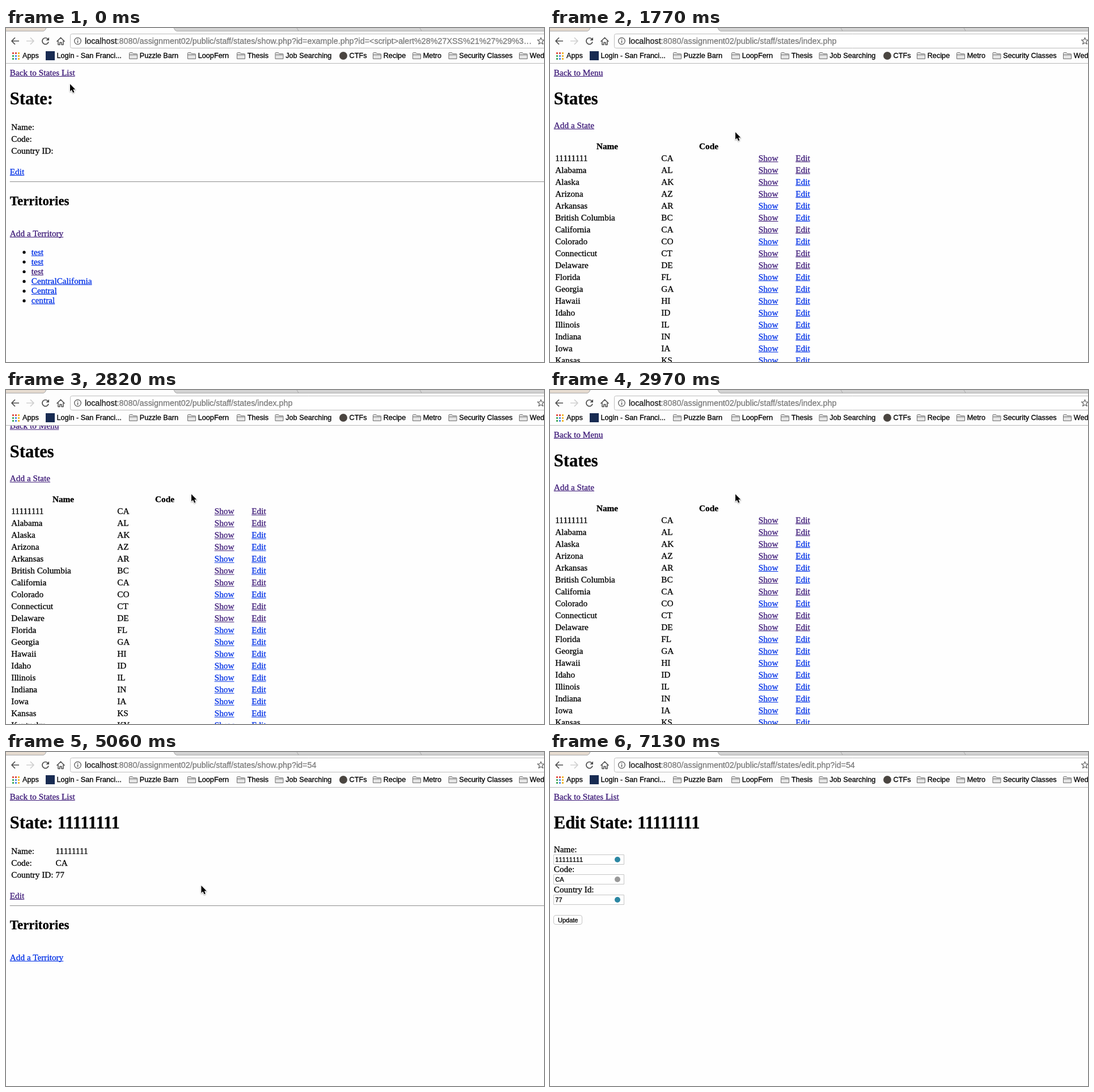
An HTML page with a canvas for the animation above (8000 ms loop, 949 px wide and 590 px high).

```html
<!DOCTYPE html>
<html lang="en">
<head>
<meta charset="utf-8">
<title>State pages</title>
<style>
html, body { margin: 0; width: 100%; height: 100%; overflow: hidden; background: #fefefe; }
canvas { display: block; }
</style>
</head>
<body>
<canvas id="stage" width="949" height="590"></canvas>
<script>
const ctx = document.getElementById('stage').getContext('2d');
const LOOP = 8000, STEP = 145;
const SERIF = '"Liberation Serif", serif', SANS = '"Liberation Sans", sans-serif';
const BODY = '15.27px ' + SERIF, BOLD = 'bold ' + BODY;
const H1 = 'bold 30.5px ' + SERIF, H2 = 'bold 22.9px ' + SERIF;
const UI = '12.7px ' + SANS, URL_FONT = '14.35px ' + SANS, FIELD = '11px ' + SANS;
const BLUE = '#0030e6', PURPLE = '#3d1a78', RED = '#ff2a14', INK = '#000';
const LEFT = 6.8;

const STATES = ('11111111 CA,Alabama AL,Alaska AK,Arizona AZ,Arkansas AR,British Columbia BC,' +
  'California CA,Colorado CO,Connecticut CT,Delaware DE,Florida FL,Georgia GA,Hawaii HI,' +
  'Idaho ID,Illinois IL,Indiana IN,Iowa IA,Kansas KS,Kentucky KY,Louisiana LA,Maine ME')
  .split(',').map(s => [s.slice(0, -3), s.slice(-2)]);
const SHOWN = new Set([0, 1, 2, 3, 5, 6, 8, 9]), EDITED = new Set([0, 1, 6, 8, 9]);

const FOLDERS = [[217, 'Puzzle Barn'], [320, 'LoopFern'], [407, 'Thesis'], [474.5, 'Job Searching'],
  [647, 'Recipe'], [717, 'Metro'], [780.5, 'Security Classes'], [905, 'Wednesday']];

// Pointer moves: start time, number of steps, end point
const MOVES = [[150, 2, 88, 79], [887, 3, 432, 116], [1480, 3, 327, 184],
  [3420, 4, 382, 234], [5060, 5, 21, 254], [6240, 6, 500, 163]];
// Times at which the hand pointer is shown
const HANDS = [[295, 887], [3855, 5060], [5640, 6240]];
// Page scroll from each time on
const SCROLL = [[0, 0], [1920, 35], [2070, 46.6], [2820, 15.6], [2970, 0]];

const ARROW = new Path2D('M0 0V12.8L3 10.2L5.1 15.2L7.4 14.2L5.3 9.4H9.3Z');
const HAND = new Path2D('M3.5 1.8Q5 .2 6.3 2L8 6.5Q9.5 5.3 10.3 6.6Q11.8 5.6 12.3 7Q13.8 6.5 14 8.5' +
  'L13.8 12L12.5 16.3H6L4.5 13.8L1 9.8Q.8 8.3 2.3 8.5L4.5 10Z');
const FINGERS = new Path2D('M8 10V13.5M10 10V13.5M12 10V13.5');

const within = (t, a, b) => t >= a && t < b;

// A hairline stroke gives the slightly heavy smoothing of the screen text
function text(s, x, y, font = BODY, color = INK, align = 'left') {
  ctx.font = font;
  ctx.fillStyle = ctx.strokeStyle = color;
  ctx.lineWidth = .3;
  ctx.textAlign = align;
  ctx.fillText(s, x, y);
  ctx.strokeText(s, x, y);
}

function link(s, x, y, color) {
  text(s, x, y, BODY, color);
  ctx.fillRect(x, Math.round(y) + 1, ctx.measureText(s).width, 1);
}

function rect(x, y, w, h, color) {
  ctx.fillStyle = color;
  ctx.fillRect(x, y, w, h);
}

function disc(x, y, r, color) {
  ctx.fillStyle = color;
  ctx.beginPath();
  ctx.arc(x, y, r, 0, 7);
  ctx.fill();
}

function rounded(x, y, w, h, r, fill, stroke) {
  ctx.beginPath();
  ctx.roundRect(x, y, w, h, r);
  ctx.fillStyle = fill;
  ctx.fill();
  ctx.strokeStyle = stroke;
  ctx.lineWidth = 1;
  ctx.stroke();
}

function line(d, color, width = 1.7) {
  ctx.strokeStyle = color;
  ctx.lineWidth = width;
  ctx.stroke(new Path2D(d));
}

function tabs() {
  rect(0, 0, 949, 5, '#d3d3d3');
  rect(0, 0, 69, 5, '#e6dbd0');
  ctx.fillStyle = '#fdfdfd';
  ctx.fill(new Path2D('M71 0H296L299 6H67Z'));
  line('M0 5.5H66Q69 5 71 0M296 0Q298 5 301 5.5H949M513 0L516 5M730 0L733 5', '#a9a9a9', 1);
}

function folder(x, label) {
  ctx.fillStyle = '#e4e4e4';
  const d = `M${x + .5} 54V44.5Q${x + .5} 43.5 ${x + 1.5} 43.5H${x + 6}L${x + 7.5} 45.5H${x + 13.5}` +
    `Q${x + 14.5} 45.5 ${x + 14.5} 46.5V54.5H${x + .5}Z`;
  ctx.fill(new Path2D(d));
  line(d + `M${x + 1} 47.5H${x + 14}`, '#6e6e6e', 1);
  text(label, x + 18.7, 53.3, UI);
}

function chrome(url, loading) {
  rect(0, 0, 949, 62, '#fdfdfd');
  tabs();
  line('M23 23H10.5M16 17L10 23L16 29', '#4d4d4d');
  line('M36 23H48.5M43 17L49 23L43 29', '#cfcfcf');
  if (loading) line('M64.5 18L74.5 28M74.5 18L64.5 28', '#4d4d4d');
  else {
    line('M73.6 19.2A5.6 5.6 0 1 0 75 24.5', '#4d4d4d');
    ctx.fillStyle = '#4d4d4d';
    ctx.fill(new Path2D('M76 16.5V22H70.5Z'));
  }
  line('M89.5 24L96.5 17L103.5 24M92 22.5V29.5H95V25.5H98V29.5H101V22.5', '#4d4d4d', 1.5);

  rounded(113.5, 10.5, 860, 25, 3, '#fff', '#bdbdbd');
  ctx.beginPath();
  ctx.arc(126.5, 23, 5.8, 0, 7);
  ctx.strokeStyle = '#5a5a5a';
  ctx.lineWidth = 1.3;
  ctx.stroke();
  rect(125.8, 22, 1.5, 4.5, '#5a5a5a');
  rect(125.8, 19.3, 1.5, 1.5, '#5a5a5a');
  text('localhost', 139, 28, URL_FONT, '#202020');
  const x = 139 + ctx.measureText('localhost').width;
  text(':8080/assignment02/public/staff/states/' + url, x, 28, URL_FONT, '#7b7b7b');
  line('M943.5 17L945.2 21H949.5L946 24L947.3 28.5L943.5 26L939.7 28.5L941 24L937.5 21H941.8Z', '#666', 1.2);

  const dots = ['#e04a3f', '#e04a3f', '#f0b52c', '#3fa757', '#4a86e8', '#f0b52c', '#3fa757', '#4a86e8', '#f0b52c'];
  dots.forEach((c, i) => rect(11 + i % 3 * 5, 43 + (i / 3 | 0) * 5, 3, 3, c));
  text('Apps', 29, 53.3, UI);
  rect(70, 41, 16, 16, '#182b52');
  text('Login - San Franci...', 89.5, 53.3, UI);
  disc(595, 49, 7, '#4a4540');
  text('CTFs', 605.5, 53.3, UI);
  FOLDERS.forEach(f => folder(...f));
  rect(0, 62, 949, 1, '#b8b8b8');
}

function details(t, filled) {
  link('Back to States List', LEFT, 84, !filled && within(t, 445, 592) ? RED : PURPLE);
  text(filled ? 'State: 11111111' : 'State:', LEFT, 135, H1);
  ['Name:', 'Code:', 'Country ID:'].forEach((s, i) => {
    text(s, 9.3, 180 + 21 * i);
    if (filled) text(['11111111', 'CA', '77'][i], 87.5, 180 + 21 * i);
  });
  link('Edit', LEFT, 259, filled ? (t >= 5785 ? RED : PURPLE) : BLUE);
  rect(LEFT, 271, 949, 1, '#8c8c8c');
  text('Territories', LEFT, 313, H2);
  link('Add a Territory', LEFT, 368, filled ? BLUE : PURPLE);
  if (filled) return;
  ['test', 'test', 'test', 'CentralCalifornia', 'Central', 'central'].forEach((s, i) => {
    const y = 400.5 + 17.15 * i;
    disc(32, y - 4.3, 2.6, INK);
    link(s, 44.7, y, i === 2 ? PURPLE : BLUE);
  });
}

function list(t) {
  const top = SCROLL.filter(s => t >= s[0]).pop()[1];
  ctx.translate(0, -top);
  link('Back to Menu', LEFT, 84, PURPLE);
  text('States', LEFT, 135, H1);
  link('Add a State', LEFT, 177, PURPLE);
  text('Name', 101, 214, BOLD, INK, 'center');
  text('Code', 280, 214, BOLD, INK, 'center');
  STATES.forEach(([name, code], i) => {
    const y = 235 + 21 * i;
    text(name, 9.3, y);
    text(code, 196.2, y);
    link('Show', 367.7, y, i === 0 && within(t, 3855, 4000) ? RED : SHOWN.has(i) ? PURPLE : BLUE);
    link('Edit', 433.2, y, EDITED.has(i) ? PURPLE : BLUE);
  });
}

function form() {
  link('Back to States List', LEFT, 84, PURPLE);
  text('Edit State: 11111111', LEFT, 135, H1);
  [['Name:', '11111111'], ['Code:', 'CA'], ['Country Id:', '77']].forEach(([label, value], i) => {
    const y = 177 + 35.4 * i, top = Math.round(y + 4) + .5;
    text(label, LEFT, y);
    rounded(6.5, top, 124, 17, 0, '#fff', '#c6c6c6');
    ctx.fontKerning = 'none';
    text(value, 9.3, top + 12.8, FIELD);
    ctx.fontKerning = 'normal';
    disc(119, top + 8.5, 5, i === 1 ? '#999' : '#2b87a3');
  });
  rounded(6.5, 288.5, 50, 16, 3.5, '#fff', '#c4c4c4');
  text('Update', 31.7, 300.5, FIELD, INK, 'center');
}

function pointerAt(t) {
  let x = 113, y = 99;
  for (const [start, steps, toX, toY] of MOVES) {
    if (t < start) break;
    const p = Math.min(1, (Math.floor((t - start) / STEP) + 1) / steps);
    const e = p * p * (3 - 2 * p);
    x += (toX - x) * e;
    y += (toY - y) * e;
  }
  return [x, y];
}

function pointer(t) {
  if (t >= 7125) return;
  const hand = HANDS.some(([a, b]) => within(t, a, b));
  const [x, y] = pointerAt(t);
  ctx.save();
  ctx.translate(hand ? x - 5 : x, hand ? y - 1 : y);
  ctx.lineJoin = 'round';
  ctx.shadowColor = 'rgba(0,0,0,.35)';
  ctx.shadowBlur = 2;
  ctx.shadowOffsetY = 1;
  ctx.strokeStyle = hand ? '#000' : '#fff';
  ctx.fillStyle = hand ? '#fff' : '#000';
  ctx.lineWidth = hand ? 1.2 : 2;
  const shape = hand ? HAND : ARROW;
  ctx.stroke(shape);
  ctx.shadowColor = 'transparent';
  ctx.fill(shape);
  if (hand) {
    ctx.lineWidth = .8;
    ctx.stroke(FINGERS);
  }
  ctx.restore();
}

function draw(now) {
  const t = now % LOOP;
  rect(0, 0, 949, 590, '#fefefe');
  ctx.save();
  let url;
  if (t < 740) {
    url = 'show.php?id=example.php?id=<script>alert%28%27XSS%21%27%29%3\u2026';
    details(t, false);
  } else if (t < 4165) {
    url = 'index.php';
    list(t);
  } else if (t < 5945) {
    url = 'show.php?id=54';
    details(t, true);
  } else {
    url = 'edit.php?id=54';
    form();
  }
  ctx.restore();
  chrome(url, within(t, 592, 740) || within(t, 4000, 4165));
  pointer(t);
}

ctx.fontKerning = 'normal';
ctx.lineJoin = 'round';
const begin = performance.now();
function frame() {
  draw(performance.now() - begin);
  requestAnimationFrame(frame);
}
frame();
</script>
</body>
</html>
```
